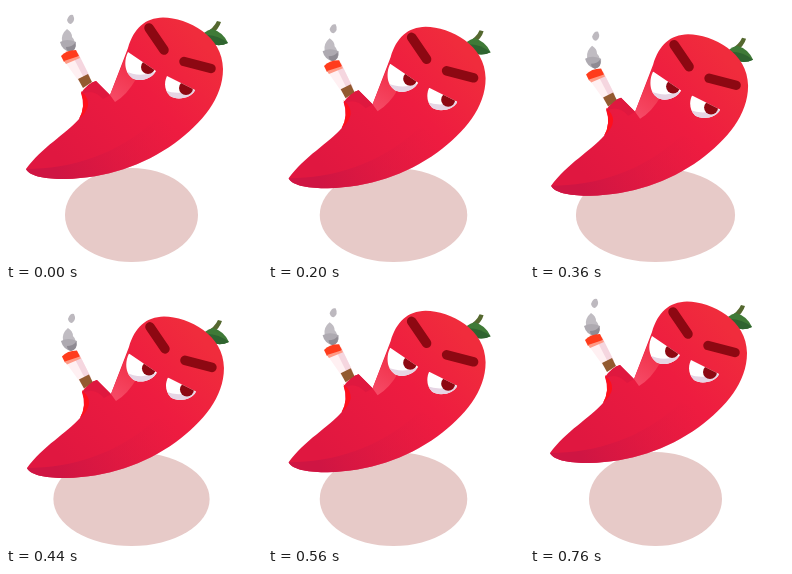
Animation, 256 px wide and 256 px high, one loop 0.8 s. Source, as an HTML page:

```html
<!DOCTYPE html>
<html lang="en">
<head>
<meta charset="utf-8">
<title>Bobbing chili</title>
<style>
  html, body { margin: 0; width: 100%; height: 100%; overflow: hidden; background: #fff; }
  svg { display: block; width: 100vw; height: 100vh; }
</style>
</head>
<body>
<svg viewBox="0 0 256 256">
  <defs>
    <linearGradient id="skin" gradientUnits="userSpaceOnUse" x1="60" y1="160" x2="200" y2="40">
      <stop offset="0" stop-color="#e01740"/>
      <stop offset=".6" stop-color="#ee1c40"/>
      <stop offset="1" stop-color="#f02c3c"/>
    </linearGradient>
    <linearGradient id="shade" gradientUnits="userSpaceOnUse" x1="50" y1="165" x2="165" y2="115">
      <stop offset="0" stop-color="#cf1543"/>
      <stop offset="1" stop-color="#e61b40" stop-opacity="0"/>
    </linearGradient>
    <linearGradient id="glow" gradientUnits="userSpaceOnUse" x1="106" y1="96" x2="134" y2="55">
      <stop offset="0" stop-color="#f64c68"/>
      <stop offset="1" stop-color="#f02a42"/>
    </linearGradient>
    <clipPath id="eyeL"><path d="M122 46L150 65C145 74 131 77 125 71C118 65 118 54 122 46Z"/></clipPath>
    <clipPath id="eyeR"><path d="M161 70L189 84C186 92 171 95 164 90C158 84 158 76 161 70Z"/></clipPath>
  </defs>

  <ellipse id="shadow" cx="125.5" cy="209" ry="47" fill="#e7cac8"/>

  <g id="chili">
    <g id="smoke">
      <path d="M61 14Q63 8 67 9Q70 15 65 18Q62 18 61 14Z" fill="#bdb9bf"/>
      <path d="M56 35Q55 28 61 23Q66 26 66 31Q70 35 68 40Q60 42 56 35Z" fill="#c0bcc2"/>
      <path d="M54 36Q61 32 70 36Q71 44 64 46Q56 44 54 36Z" fill="#aeaab1"/>
      <path d="M60 41Q66 41 69 37Q71 44 64 46Q60 45 60 41Z" fill="#8f8b93"/>
    </g>

    <path d="M199 27Q208 22 211 15L215 16Q213 23 205 29Z" fill="#55682f"/>
    <path d="M194 33Q197 25 206 23Q217 26 222 37Q212 42 200 36Z" fill="#3f7a37"/>
    <path d="M200 29Q212 29 222 37Q212 42 200 36Z" fill="#2f6430"/>

    <path fill="url(#skin)" d="M20 163C36 141 60 128 73 113Q80 101 75 87Q82 77 90 75L104 89L122 42C128 22 139 12 157 11.500C182 12 217 30 217 63C217 92 196 117 169 137C137 160 100 172 59 173C42 173 24 171 20 163Z"/>
    <path fill="url(#shade)" d="M20 163C64 163 112 149 150 113L190 120C182 127 176 132 169 137C137 160 100 172 59 173C42 173 24 171 20 163Z"/>
    <path fill="url(#glow)" d="M104 89L122 44Q118 65 130 73Q121 89 109 96Z"/>
    <path fill="#ff0f1c" d="M75 85Q90 98 73 113Q80 101 75 85Z"/>

    <g id="cigarette">
      <path d="M56 52L72 47L84 71L74 77Z" fill="#fff0f2"/>
      <path d="M66 49L72 47L84 71L79 74Z" fill="#f5d6df"/>
      <path d="M72 73L82 68L86 76L77 82Z" fill="#935a30"/>
      <path d="M55 50Q60 44 70 44L73 50Q67 54 58 56Z" fill="#ff3c1c"/>
      <path d="M58 55L73 50L74 52L60 58Z" fill="#ff9a86"/>
    </g>
    <path fill="#df183f" d="M76 88Q82 77 90 75L104 89L97 93Q87 82 76 88Z"/>

    <g id="face">
      <g clip-path="url(#eyeL)">
        <path d="M115 40H155V80H115Z" fill="#fff"/>
        <path d="M117 64Q133 73 151 65V80H117Z" fill="#e6d5e4"/>
        <circle cx="142" cy="61" r="7" fill="#8d0812"/>
      </g>
      <g clip-path="url(#eyeR)">
        <path d="M155 65H192V97H155Z" fill="#fff"/>
        <path d="M158 84Q172 90 190 83V97H158Z" fill="#e6d5e4"/>
        <circle cx="180" cy="82" r="7" fill="#8d0812"/>
      </g>
    </g>
    <path d="M143 22L158 44M178 55.500L205 62.500" stroke="#8d0812" stroke-width="9.500" stroke-linecap="round"/>
  </g>
</svg>
<script>
  const LOOP = 800, STEP = 40, HALF = 380;
  const part = id => document.getElementById(id);
  const place = (id, value) => part(id).setAttribute('transform', value);

  function draw(now) {
    const t = Math.floor(now % LOOP / STEP) * STEP;
    const fall = HALF - Math.abs(t - HALF);
    const wiggle = Math.sin(Math.PI * Math.min(fall, 320) / 320) ** 2;

    part('shadow').setAttribute('rx', 66.5 + fall * 0.0363);
    place('chili', `translate(${fall * 0.003} ${fall * 0.0465})`);
    place('face', `translate(${-wiggle * 0.5} ${fall * 0.008 + wiggle})`);
    place('cigarette', `translate(0 ${fall * 0.005}) rotate(${wiggle} 80 79)`);
    requestAnimationFrame(draw);
  }
  requestAnimationFrame(draw);
</script>
</body>
</html>
```
